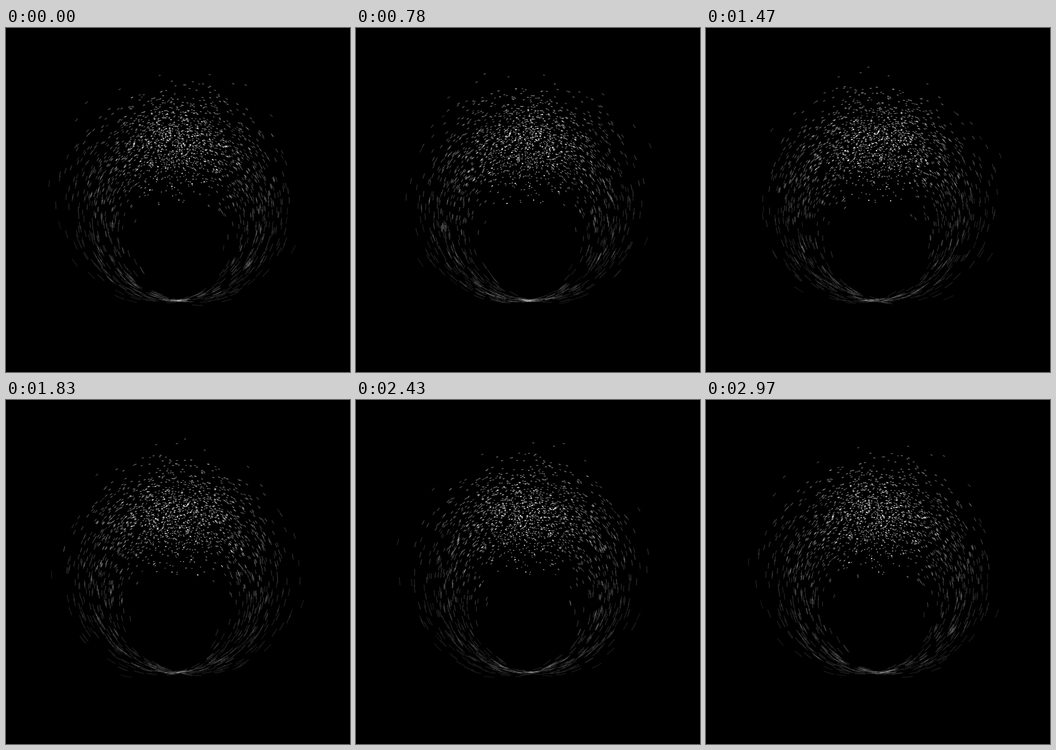
An HTML page with a canvas that plays this animation: 600x600 px, repeating every 3 s.

```html
<!DOCTYPE html>
<html lang="en">
<head>
<meta charset="utf-8">
<title>Particle ring</title>
<style>
  html, body { margin: 0; width: 100%; height: 100%; overflow: hidden; background: #000; }
  canvas { display: block; width: 600px; height: 600px; }
</style>
</head>
<body>
<canvas id="stage" width="600" height="600"></canvas>
<script>
const ctx = document.getElementById('stage').getContext('2d');
const TAU = Math.PI * 2;
const LOOP = 3000, STEP = 30;
const LAPS = 2;            // loops a particle needs for one turn
const PATHS = 1100;
const RING = { x: 300, y: 330.5, radius: 145 };
const PULL = 0.55;         // how much particles linger at the top
const SQUEEZE = (1 - PULL) / (1 + PULL);
const SHUTTER = STEP / LOOP / LAPS;
const PARTS = 4;           // segments in one blurred streak

let seed = 90317;
function rnd() {
  seed = (seed + 0x6D2B79F5) | 0;
  let v = Math.imul(seed ^ (seed >>> 15), 1 | seed);
  v = (v + Math.imul(v ^ (v >>> 7), 61 | v)) ^ v;
  return ((v ^ (v >>> 14)) >>> 0) / 4294967296;
}

function gauss(limit) {
  let g;
  do {
    g = Math.sqrt(-2 * Math.log(1 - rnd())) * Math.cos(TAU * rnd());
  } while (Math.abs(g) > limit);
  return g;
}

const paths = Array.from({ length: PATHS }, () => ({
  spread: 40 * gauss(2.95),
  lift: 1.4 * gauss(2.2),
  phase: rnd(),
  width: 0.9 + 0.7 * rnd()
}));

// Clockwise from the top: slow and scattered there, fast and narrow below.
function place(path, turn) {
  const u = (turn - Math.floor(turn) - 0.5) * TAU;
  const angle = 2 * Math.atan(SQUEEZE * Math.tan(u / 2));
  const radius = RING.radius + path.lift + path.spread * Math.cos(angle / 2);
  return [RING.x + radius * Math.sin(angle), RING.y - radius * Math.cos(angle)];
}

function streak(path, turn) {
  let length = 0;
  let [x, y] = place(path, turn - SHUTTER / 2);
  ctx.beginPath();
  ctx.moveTo(x, y);
  for (let i = 1; i <= PARTS; i++) {
    const [nx, ny] = place(path, turn + (i / PARTS - 0.5) * SHUTTER);
    length += Math.hypot(nx - x, ny - y);
    ctx.lineTo(nx, ny);
    [x, y] = [nx, ny];
  }
  ctx.globalAlpha = 2.2 / (length + 2.2);
  ctx.lineWidth = path.width;
  ctx.stroke();
}

function draw(time) {
  ctx.globalCompositeOperation = 'source-over';
  ctx.globalAlpha = 1;
  ctx.fillStyle = '#000';
  ctx.fillRect(0, 0, 600, 600);
  ctx.globalCompositeOperation = 'lighter';
  ctx.strokeStyle = '#e6e6e6';
  ctx.lineCap = ctx.lineJoin = 'round';
  for (const path of paths) {
    for (let lap = 0; lap < LAPS; lap++) {
      streak(path, (path.phase + lap + time / LOOP) / LAPS);
    }
  }
}

const start = performance.now();
let shown = -1;
function tick() {
  const time = Math.max(0, performance.now() - start) % LOOP;
  const step = Math.floor(time / STEP);
  if (step !== shown) {
    shown = step;
    draw(step * STEP);
  }
  requestAnimationFrame(tick);
}
tick();
</script>
</body>
</html>
```
